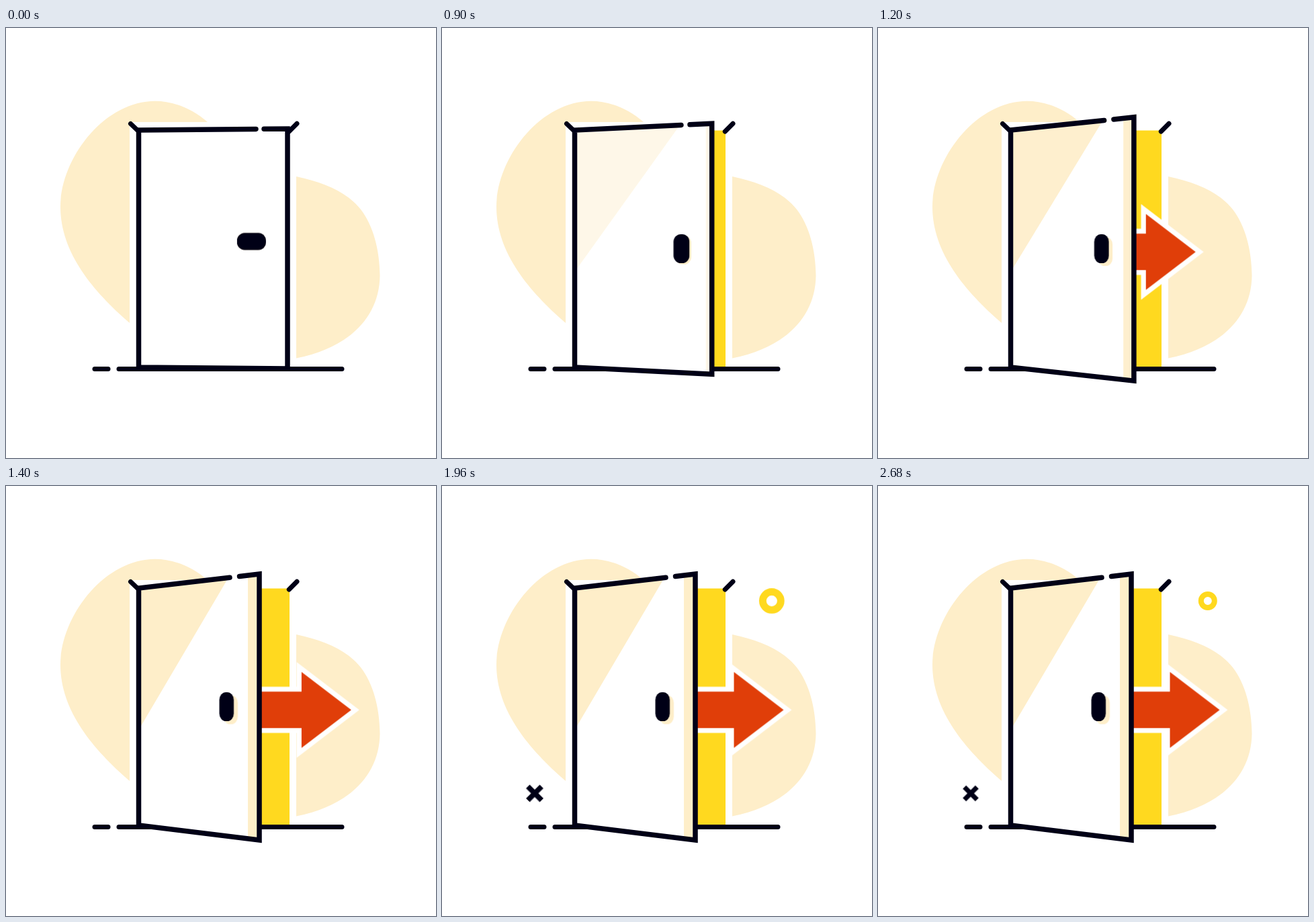
Recreate the animation shown at these times as an HTML page. Size 640 px wide and 640 px high, loop 3040 ms.

```html
<!DOCTYPE html>
<html lang="en">
<head>
<meta charset="utf-8">
<title>Opening door</title>
<style>
  :root {
    --ink: #000016;
    --cream: #feeec9;
    --smooth: cubic-bezier(.333, 0, .667, 1);
    --swing: cubic-bezier(.3, 0, .51, 1);
  }
  html, body { margin: 0; width: 100%; height: 100%; overflow: hidden; background: #fff; }
  svg { display: block; width: 100%; height: 100%; }

  .cream { fill: var(--cream); }
  .ink { fill: var(--ink); }
  .line { fill: none; stroke: var(--ink); stroke-width: 7; stroke-linecap: round; }
  .edge { stroke-width: 7.5; stroke-miterlimit: 10; }

  .leaf, .shine, .strip, .edge, .slide, .shift { animation: 3040ms var(--swing) infinite; }
  .turn, .arrow, .cross, .ring { animation: 3040ms var(--smooth) infinite; }

  /* Door swing: 600 to 1400 ms */
  .leaf { animation-name: leaf; }
  .shine { animation-name: shine, appear; }
  .strip { animation-name: strip, appear; }
  .edge { animation-name: edge; }
  .slide { animation-name: slide; }
  .shift { animation-name: shift; }
  @keyframes leaf {
    0%, 19.74% { d: path("M197.5 152 L419 150 L419 507 L197.5 505 Z"); }
    46.05%, 100% { d: path("M197.5 152 L377 131 L377 527 L197.5 505 Z"); }
  }
  @keyframes shine {
    0%, 19.74% { d: path("M197.5 152 L370 150.4 L197.5 363 Z"); }
    46.05%, 100% { d: path("M197.5 152 L331 136.4 L197.5 363 Z"); }
  }
  @keyframes strip {
    0%, 19.74% { d: path("M415.5 150 L419 150 L419 507 L415.5 507 Z"); }
    46.05%, 100% { d: path("M360 133 L377 131 L377 527 L360 525 Z"); }
  }
  @keyframes edge {
    0%, 19.74% { d: path("M372 150.4 L197.5 152 L197.5 505 L419 507 L419 150 L384 150.3"); }
    46.05%, 100% { d: path("M333 136.2 L197.5 152 L197.5 505 L377 527 L377 131 L347.5 134.5"); }
  }
  @keyframes appear {
    0%, 19.74% { opacity: 0; }
    46.05%, 100% { opacity: 1; }
  }
  @keyframes slide {
    0%, 19.74% { transform: translate(376.2px, 0) scale(1, 1); }
    46.05%, 100% { transform: translate(328.3px, 0) scale(.846, 1); }
  }
  @keyframes shift {
    0%, 19.74% { transform: translate(0, 0); }
    46.05%, 100% { transform: translate(7.1px, 4.5px); }
  }

  /* Handle turn: 80 to 600 ms */
  .turn { animation-name: turn; transform-origin: 0 317.7px; }
  @keyframes turn {
    0%, 2.63% { transform: rotate(90deg); }
    19.74%, 100% { transform: rotate(0deg); }
  }

  /* Arrow, placed by its tip */
  .arrow { animation-name: arrow; fill: #e03e09; }
  @keyframes arrow {
    0%, 26.32% { transform: translate(384px, 333.3px); }
    47.7% { transform: translate(516px, 333.3px); }
    63.16%, 100% { transform: translate(508.5px, 333.3px); }
  }

  .cross { animation-name: spin, pop-cross; stroke: var(--ink); stroke-width: 7; }
  @keyframes spin {
    0%, 46.05% { rotate: -135deg; }
    62.5%, 100% { rotate: 45deg; }
  }
  @keyframes pop-cross {
    0%, 46.05% { scale: 0; }
    55.92% { scale: 1.34; }
    69.08%, 100% { scale: 1; }
  }

  .ring { animation-name: pop-ring; fill: none; stroke: #ffd91f; stroke-width: 8; }
  @keyframes pop-ring {
    0%, 53.95% { scale: 0; }
    63.82% { scale: 1.35; }
    78.95%, 100% { scale: 1; }
  }
</style>
</head>
<body>
<svg viewBox="0 0 640 640">
  <!-- Backdrop and frame -->
  <path class="cream" d="M300 140 C276 119 248 108.7 222 108.7 C145 109 81 195 81 266 C81 335 130 392 184 439 L432 491.5 C511 476 556 430 556.5 368 C556 330 547 295 528 270 C508 245 475 230 432 221 Z"/>
  <rect x="184" y="140" width="248" height="367" fill="#fff"/>
  <rect x="200" y="152.5" width="222" height="353" fill="#ffd91f"/>
  <path class="line" d="M132 507.5 H152 M168 507.5 H500"/>

  <g class="arrow">
    <path d="M0 0 L-74 -56.5 V-27.3 H-160 V27 H-74 V56.5 Z" stroke="#fff" stroke-width="14.5" paint-order="stroke"/>
  </g>

  <!-- Door -->
  <path class="leaf" fill="#fff"/>
  <path class="shine cream"/>
  <path class="strip cream"/>
  <path class="line edge"/>
  <path class="line" d="M185.5 142.5 L196 152.5 M433 142.3 L421.3 154"/>
  <g class="slide">
    <g class="shift">
      <rect class="turn cream" x="-12.7" y="307" width="25.4" height="43" rx="11.5"/>
    </g>
    <rect class="turn ink" x="-12.7" y="307" width="25.4" height="43" rx="11.5"/>
  </g>

  <!-- Accents -->
  <g transform="translate(138 457.5)">
    <path class="cross" d="M-13.2 0 H13.2 M0 -13.2 V13.2"/>
  </g>
  <g transform="translate(490.8 171)">
    <circle class="ring" r="10"/>
  </g>
</svg>
</body>
</html>
```
